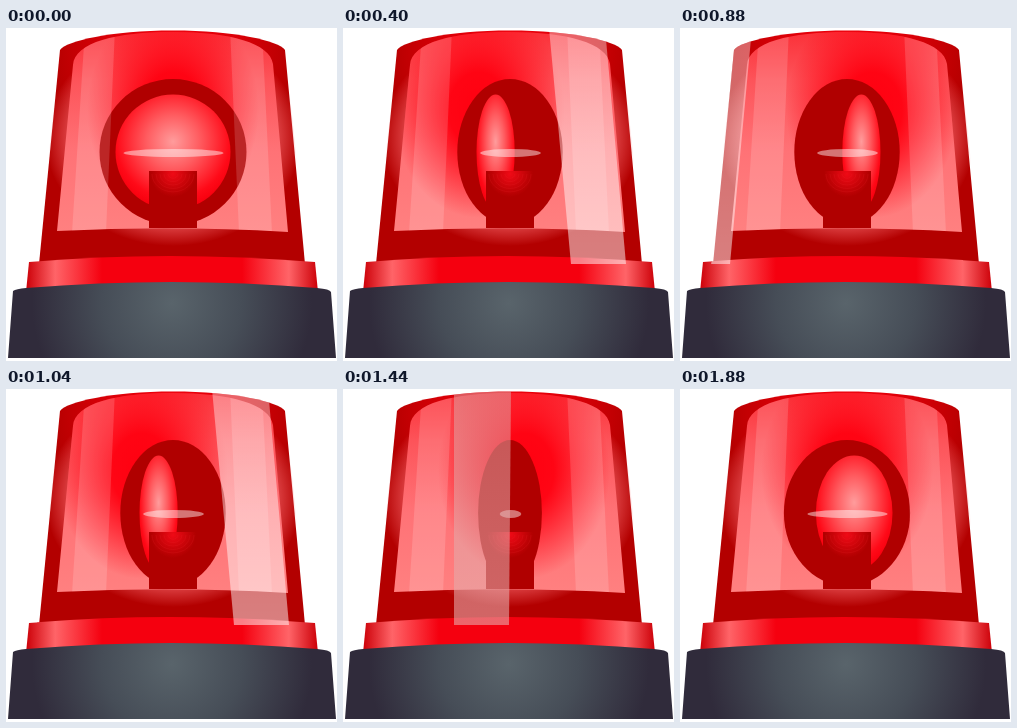
These frames come from a looping animation (331 px wide and 333 px high, 1.92 s). An HTML page:

```html
<!DOCTYPE html>
<html lang="en">
<head>
<meta charset="utf-8">
<title>Rotating beacon</title>
<style>
  html, body { margin: 0; width: 100%; height: 100%; overflow: hidden; background: #fff; }
  svg { display: block; width: 100vw; height: 100vh; }
</style>
</head>
<body>
<svg viewBox="0 0 331 333" preserveAspectRatio="none">
  <defs>
    <radialGradient id="domeFill" gradientUnits="userSpaceOnUse" cx="167" cy="20" r="125">
      <stop offset="0" stop-color="#f2000c"/>
      <stop offset=".5" stop-color="#dc0008"/>
      <stop offset="1" stop-color="#b30000"/>
    </radialGradient>
    <linearGradient id="glassFill" gradientUnits="userSpaceOnUse" x1="0" y1="3" x2="0" y2="203">
      <stop offset="0" stop-color="#fb3038"/>
      <stop offset=".25" stop-color="#fd545a"/>
      <stop offset=".6" stop-color="#ff7276"/>
      <stop offset="1" stop-color="#ff8080"/>
    </linearGradient>
    <radialGradient id="haloFill">
      <stop offset="0" stop-color="#ff7478" stop-opacity=".8"/>
      <stop offset=".8" stop-color="#ff7478" stop-opacity=".6"/>
      <stop offset="1" stop-color="#ff7478" stop-opacity="0"/>
    </radialGradient>
    <radialGradient id="coreFill">
      <stop offset="0" stop-color="#ff0010"/>
      <stop offset=".35" stop-color="#ff0010" stop-opacity=".95"/>
      <stop offset="1" stop-color="#ff0010" stop-opacity="0"/>
    </radialGradient>
    <radialGradient id="lensFill" cx=".5" cy=".41" r=".58">
      <stop offset="0" stop-color="#ff9c9c"/>
      <stop offset=".4" stop-color="#ff5c60"/>
      <stop offset=".85" stop-color="#ff0a18"/>
      <stop offset="1" stop-color="#f8000e"/>
    </radialGradient>
    <radialGradient id="stemFill" gradientUnits="userSpaceOnUse" cx="167" cy="146" r="23">
      <stop offset="0" stop-color="#f00a16"/>
      <stop offset="1" stop-color="#b00000"/>
    </radialGradient>
    <linearGradient id="frontBand" gradientUnits="userSpaceOnUse" x1="0" y1="3" x2="0" y2="237">
      <stop offset="0" stop-color="#fff" stop-opacity=".38"/>
      <stop offset="1" stop-color="#fff" stop-opacity=".5"/>
    </linearGradient>
    <linearGradient id="backBand" gradientUnits="userSpaceOnUse" x1="0" y1="3" x2="0" y2="237">
      <stop offset="0" stop-color="#dcaaaa" stop-opacity=".5"/>
      <stop offset="1" stop-color="#e6aaaa" stop-opacity=".6"/>
    </linearGradient>
    <linearGradient id="collarFill">
      <stop offset="0" stop-color="#cc0008"/>
      <stop offset=".1" stop-color="#ff6468"/>
      <stop offset=".26" stop-color="#f5000f"/>
      <stop offset=".74" stop-color="#f5000f"/>
      <stop offset=".9" stop-color="#ff6468"/>
      <stop offset="1" stop-color="#cc0008"/>
    </linearGradient>
    <radialGradient id="baseFill" gradientUnits="userSpaceOnUse" cx="166" cy="275" r="140">
      <stop offset="0" stop-color="#59646b"/>
      <stop offset=".5" stop-color="#464d57"/>
      <stop offset="1" stop-color="#302b3b"/>
    </radialGradient>
    <clipPath id="domeClip">
      <path d="M54 22C60 13 105 2.5 167 2.5S273 13 279 22L302 237H31Z"/>
    </clipPath>
    <clipPath id="glassClip">
      <path id="glass" d="M67 37C69 14 110 4 167 4S264 15 267 36L282 204Q167 197 51 203Z"/>
    </clipPath>
  </defs>

  <path d="M54 22C60 13 105 2.5 167 2.5S273 13 279 22L299 236H33Z" fill="url(#domeFill)"/>
  <ellipse cx="167" cy="110" rx="128" ry="108" fill="url(#haloFill)" clip-path="url(#domeClip)"/>
  <use href="#glass" fill="url(#glassFill)"/>
  <g clip-path="url(#glassClip)">
    <ellipse id="core" cy="82" rx="86" ry="108" fill="url(#coreFill)"/>
  </g>
  <ellipse id="reflector" cx="167" cy="124" ry="73" fill="#b00000"/>
  <ellipse id="lens" cy="124" ry="57.5" fill="url(#lensFill)"/>
  <path d="M143 143H191V200H143Z" fill="url(#stemFill)"/>
  <g id="rings" fill="none" stroke="#f03038" stroke-opacity=".2" stroke-width=".8"></g>
  <ellipse id="shine" cx="167.5" cy="125" ry="4" fill="#fff" fill-opacity=".46"/>
  <g clip-path="url(#glassClip)" fill="#fff" fill-opacity=".15">
    <path d="M79 0H109L100 205H66Z"/>
    <path d="M224 0H256L266 205H233Z"/>
  </g>
  <path d="M23 234Q162 222 309 234L312 264H20Z" fill="url(#collarFill)"/>
  <path id="band" clip-path="url(#domeClip)"/>
  <path d="M7 263Q10 261 20 260Q166 248 311 260Q324 261 325 264L330 330H2Z" fill="url(#baseFill)"/>
</svg>
<script>
const STEP = 40, STEPS = 8, CENTER = 167;
const $ = id => document.getElementById(id);
const set = (id, attrs) => {
  for (const name in attrs) $(id).setAttribute(name, attrs[name]);
};

// Sweeping reflection: top left, top right, bottom left, bottom right
const bands = {
  1: [262, 280, 285, 302],
  2: [206, 262, 228, 283],
  3: [161, 215, 170, 224],
  4: [111, 168, 111, 166],
  5: [68, 122, 54, 108],
  6: [55, 72, 31, 50]
};

$('rings').innerHTML = [5, 9, 13, 17, 21].map(r =>
  `<path d="M${167 - r} 146A${r} ${r * .85} 0 0 0 ${167 + r} 146"/>`).join('');

function draw(time) {
  const step = Math.floor(time / STEP) % STEPS;
  const turn = step > 4 ? step - STEPS : step;
  const away = Math.abs(turn);
  const band = bands[step];

  set('core', { cx: CENTER - 32 * Math.sin(step * Math.PI / 3.5) });
  set('reflector', { rx: 73.5 - 10.4 * away });
  set('lens', { cx: CENTER - 7.2 * turn, rx: Math.max(0, 57.5 - 19.2 * away) });
  $('lens').style.display = away > 2 ? 'none' : '';
  set('shine', { rx: 50 - 9.8 * away });
  set('band', {
    d: band ? `M${band[0]} 0H${band[1]}L${band[3]} 236H${band[2]}Z` : '',
    fill: Math.abs(step - 3.5) < 1 ? 'url(#backBand)' : 'url(#frontBand)'
  });
}

const start = performance.now();
function tick() {
  draw(performance.now() - start);
  requestAnimationFrame(tick);
}
tick();
</script>
</body>
</html>
```
